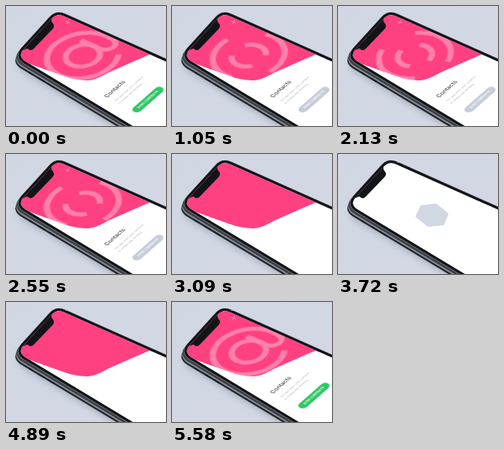
Recreate the animation shown at these times as an HTML page. Size 200 px wide and 150 px high, loop 5610 ms.

```html
<!DOCTYPE html>
<html lang="en">
<head>
<meta charset="utf-8">
<title>Contacts sync</title>
<style>
  html, body { margin: 0; width: 100%; height: 100%; overflow: hidden; background: #d1d7e3; }
  svg { display: block; width: 100%; height: 100%; }
  text { font-family: Inter, Roboto, sans-serif; }

  .sheet, .at, .ring, .bowl, .tail, .copy, .button, .pill {
    animation: 5610ms linear infinite;
  }

  /* Header sheet: collapses into a hexagon and grows back */
  .sheet { stroke-width: 4; stroke-linejoin: round; animation-name: sheet; }
  @keyframes sheet {
    0%, 55.08% {
      d: path("M12 64C30 44 46 24 62 4C102 22 142 40 181 58C162 66 144 74 126 82C118 86 112 91 102 91C95 91 88 90 80 88C55 80 30 70 12 64Z");
      fill: #ff4081; stroke: #ff4081;
      animation-timing-function: cubic-bezier(.5, 0, .2, 1);
    }
    64.7%, 74.87% {
      d: path("M99 78C101 74 103 70 105 66C111 65 116 65 122 64C127 68 131 71 136 75C134 79 133 83 131 87C125 88 119 88 113 89C108 85 104 82 99 78Z");
      fill: #d1d7e3; stroke: #d1d7e3;
      animation-timing-function: cubic-bezier(.5, 0, .8, .6);
    }
    84.49% {
      d: path("M75 74C79 65 83 55 87 46C97 45 108 44 118 43C128 51 139 60 148 68C144 74 140 79 135 85C125 87 115 89 104 90C94 85 85 80 75 74Z");
      fill: #ff5c93; stroke: #ff5c93;
      animation-timing-function: ease-out;
    }
    87.17%, 100% {
      d: path("M12 64C30 44 46 24 62 4C102 22 142 40 181 58C162 66 144 74 126 82C118 86 112 91 102 91C95 91 88 90 80 88C55 80 30 70 12 64Z");
      fill: #ff4081; stroke: #ff4081;
    }
  }

  /* The @ sign splits into two spinning pairs of arcs */
  .at { fill: none; stroke: #fff; stroke-width: 16; animation-name: at; }
  @keyframes at {
    0%, 49% { opacity: .34; }
    54.55%, 95.19% { opacity: 0; }
    99.47%, 100% { opacity: .34; }
  }
  .ring { animation-name: ring; }
  @keyframes ring {
    0%, 14.44% { transform: rotate(55deg); stroke-dasharray: 152 0 153 55; }
    18.72% { transform: rotate(-12.5deg); stroke-dasharray: 115 65 115 65; }
    49% { stroke-dasharray: 115 65 115 65; }
    54.55% { transform: rotate(-736deg); stroke-dasharray: 30 150 30 150; }
    54.56%, 95.19% { transform: rotate(55deg); stroke-dasharray: 60 0 60 240; }
    99.47%, 100% { transform: rotate(55deg); stroke-dasharray: 152 0 153 55; }
  }
  .bowl { animation-name: bowl; }
  @keyframes bowl {
    0%, 14.44% { transform: rotate(-141deg); stroke-dasharray: 180 0 180 0; }
    18.72%, 49% { stroke-dasharray: 110 70 110 70; }
    54.55% { transform: rotate(669deg); stroke-dasharray: 30 150 30 150; }
    54.56%, 95.19% { transform: rotate(-141deg); stroke-dasharray: 60 120 60 120; }
    99.47%, 100% { transform: rotate(-141deg); stroke-dasharray: 180 0 180 0; }
  }
  .tail { stroke-dasharray: 100 100; animation-name: tail; }
  @keyframes tail {
    0%, 14.44% { stroke-dashoffset: 0; opacity: 1; }
    17.6% { stroke-dashoffset: 100; opacity: 1; }
    17.61%, 95.19% { stroke-dashoffset: 100; opacity: 0; }
    95.2% { stroke-dashoffset: 100; opacity: 1; }
    99.47%, 100% { stroke-dashoffset: 0; opacity: 1; }
  }

  .copy { animation-name: copy; }
  @keyframes copy {
    0%, 46% { opacity: 1; }
    52%, 88.2% { opacity: 0; }
    93.6%, 100% { opacity: 1; }
  }
  .button { animation-name: button; }
  @keyframes button {
    0%, 46.5% { opacity: 1; }
    53.5%, 90% { opacity: 0; }
    94.65%, 100% { opacity: 1; }
  }
  .pill { animation-name: pill; }
  @keyframes pill {
    0%, .53% { fill: #2fc866; }
    8.02%, 95.19% { fill: #c6cdd9; }
    99.47%, 100% { fill: #2fc866; }
  }
</style>
</head>
<body>
<svg viewBox="0 0 200 150">
  <defs>
    <path id="screen" d="M21 55.5L57 16Q63.5 8.5 73 13L230 83V193L24 69Q15 63 21 55.5Z"/>
    <clipPath id="glass"><use href="#screen"/></clipPath>
    <linearGradient id="wall" x2="1" y2="1">
      <stop stop-color="#d0d6e2"/><stop offset="1" stop-color="#d4d9e4"/>
    </linearGradient>
    <filter id="soft" x="-20%" y="-20%" width="140%" height="140%">
      <feGaussianBlur stdDeviation="4"/>
    </filter>
  </defs>

  <rect width="200" height="150" fill="url(#wall)"/>

  <!-- Phone body -->
  <g stroke-linejoin="round">
    <use href="#screen" x="-3" y="13" fill="#7f889c" opacity=".55" filter="url(#soft)"/>
    <use href="#screen" x="-4" y="6.5" fill="#24272d" stroke="#24272d" stroke-width="6"/>
    <use href="#screen" x="-3" y="4.5" fill="#8b9099" stroke="#8b9099" stroke-width="6"/>
    <use href="#screen" x="-2" y="2.5" fill="#3b3f46" stroke="#3b3f46" stroke-width="7"/>
    <use href="#screen" stroke="#9da2ab" stroke-width="7.6"/>
    <use href="#screen" stroke="#121418" stroke-width="6.6"/>
    <path d="M29 83l4 2.4M41 90.3l7 4.2M53 97.5l7 4.2" stroke="#1c1f24" stroke-width="1.8" stroke-linecap="round"/>
  </g>

  <!-- Display -->
  <g clip-path="url(#glass)">
    <rect width="200" height="150" fill="#fff"/>
    <path class="sheet"/>

    <g transform="matrix(.325 -.263 .366 .165 96 62)">
      <g class="at">
        <circle class="ring" r="92" pathLength="360"/>
        <circle class="bowl" r="44" pathLength="360"/>
        <path class="tail" pathLength="100" d="M92 0V14C92 54 44 54 44 14V-46"/>
      </g>
    </g>

    <g class="copy">
      <path d="M74.3 19.3l5.4 1.8M75.3 22.7l3.6-5" stroke="#fff" stroke-opacity=".6" stroke-width=".7"/>
      <text transform="matrix(.75 -.66 .86 .42 126.5 115)" font-size="7.3" fill="#23262d">Contacts</text>
      <g font-size="3.6" fill="#a5abb6">
        <text transform="matrix(.75 -.66 .86 .42 137 119.5)">Our app uses your contacts</text>
        <text transform="matrix(.75 -.66 .86 .42 142 122.5)">to simple app working</text>
      </g>
    </g>

    <g class="button" transform="matrix(.75 -.66 .88 .44 177.5 117)">
      <rect class="pill" x="-23.2" y="-5.1" width="46.4" height="10.2" rx="5.1"/>
      <text y="1.4" font-size="3.8" font-weight="700" text-anchor="middle" fill="#fff">SYNC CONTACTS</text>
    </g>

    <path fill="#121418" d="M20 53L53 15L57 16Q56 19 58 21Q62 25 58 29L35 53Q31 57 28 54Q27 52 22 55Z"/>
  </g>
</svg>
</body>
</html>
```
